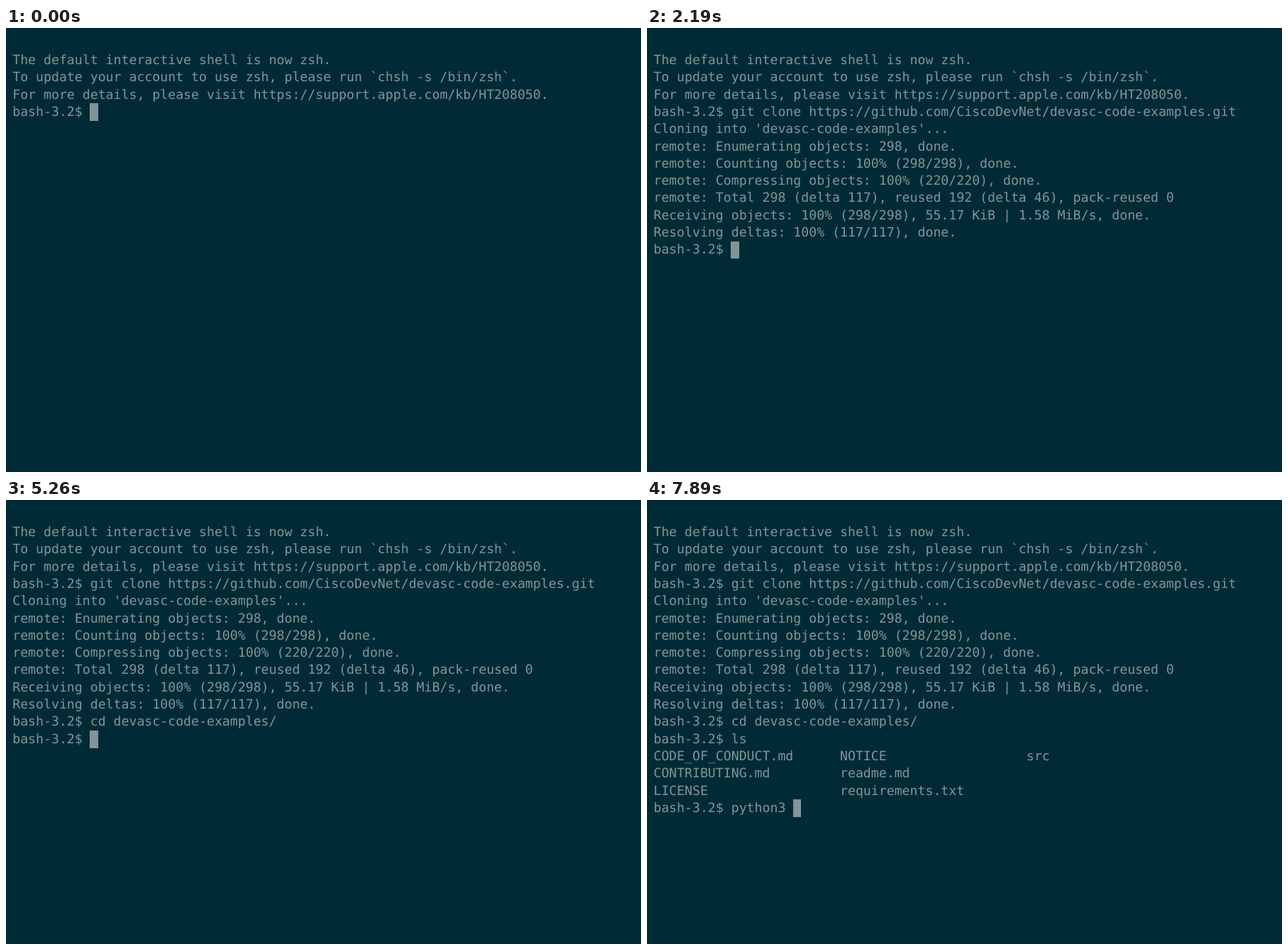
Write an HTML page that moves like this. It is 895 px wide and 626 px high and loops after 8000 ms.

```html
<!DOCTYPE html>
<html lang="en">
<head>
<meta charset="utf-8">
<title>Terminal session</title>
<style>
  html, body {
    margin: 0;
    width: 100%;
    height: 100%;
    overflow: hidden;
    background: #002b36;
  }
  #screen, #stage {
    position: absolute;
    margin: 0;
  }
  #screen {
    left: 9.2px;
    top: 9.67px;
    color: #839496;
    font: 18.2px/24.3125px "DejaVu Sans Mono", monospace;
    font-variant-ligatures: none;
    text-rendering: geometricPrecision;
    white-space: pre;
  }
  #stage {
    left: 0;
    top: 0;
  }
</style>
</head>
<body>
<pre id="screen"></pre>
<svg id="stage" width="895" height="626">
  <rect id="cursor" fill="#839496"/>
</svg>
<script>
const LOOP = 8000;
const LEFT = 9.2, TOP = 9.15, COL = 10.957, ROW = 24.3125;
const PROMPT = 'bash-3.2$ ';

const greeting = `
The default interactive shell is now zsh.
To update your account to use zsh, please run \`chsh -s /bin/zsh\`.
For more details, please visit https://support.apple.com/kb/HT208050.
${PROMPT}`;

const remote = `remote: Enumerating objects: 298, done.
remote: Counting objects: 100% (298/298), done.
remote: Compressing objects: 100% (220/220), done.
remote: Total 298 (delta 117), reused 192 (delta 46), pack-reused 0
`;

const received = `Receiving objects: 100% (298/298), 55.17 KiB | 1.58 MiB/s, done.
Resolving deltas: 100% (117/117), done.
${PROMPT}`;

const row = (...cells) => cells.map(c => c.padEnd(24)).join('').trimEnd() + '\n';
const listing =
  row('CODE_OF_CONDUCT.md', 'NOTICE', 'src') +
  row('CONTRIBUTING.md', 'readme.md') +
  row('LICENSE', 'requirements.txt') + PROMPT;

// Evenly spaced key strokes; each item is what arrives in one step.
const type = (start, keys, gap = 60) => keys.map((key, i) => [start + i * gap, key]);

const events = [
  [0, greeting],
  ...type(730, ['g', 'i', 't', ' ', 'cl', 'o', 'n', 'e ']),
  [1340, 'https://github.com/CiscoDevNet/devasc-code-examples.git'],
  [1870, "\nCloning into 'devasc-code-examples'...\n"],
  [2130, remote],
  [2190, received],
  ...type(2580, ['c', 'd']),
  [3100, ' '],
  [3630, 'd'],
  ...type(3760, ['e', 'v']),
  ...type(3950, ['a', 's', 'c']),
  [4200, '-code-examples/'],
  [5260, '\n' + PROMPT],
  ...type(5650, ['l', 's']),
  [5840, '\n'],
  [5900, listing],
  ...type(6830, ['p', 'y', 'h', 'o', 'n']),
  ...type(7270, ['\b', '\b', '\b', 't', 'h', 'on']),
  ...type(7830, ['3', ' '])
];

const screenEl = document.getElementById('screen');
const cursor = document.getElementById('cursor');
let shown = null;

function textAt(t) {
  let text = '';
  for (const [time, data] of events) {
    if (time > t) break;
    text = data === '\b' ? text.slice(0, -1) : text + data;
  }
  return text;
}

// The block covers its whole cell, snapped to pixels.
function placeCursor(col, line) {
  const x = Math.floor(LEFT + col * COL);
  const y = Math.round(TOP + line * ROW);
  cursor.setAttribute('x', x);
  cursor.setAttribute('y', y);
  cursor.setAttribute('width', Math.round(LEFT + (col + 1) * COL) - x);
  cursor.setAttribute('height', Math.round(TOP + (line + 1) * ROW) - y);
}

function draw() {
  const text = textAt(performance.now() % LOOP);
  if (text !== shown) {
    shown = text;
    screenEl.textContent = text;
    const lines = text.split('\n');
    placeCursor(lines.at(-1).length, lines.length - 1);
  }
  requestAnimationFrame(draw);
}
draw();
</script>
</body>
</html>
```
